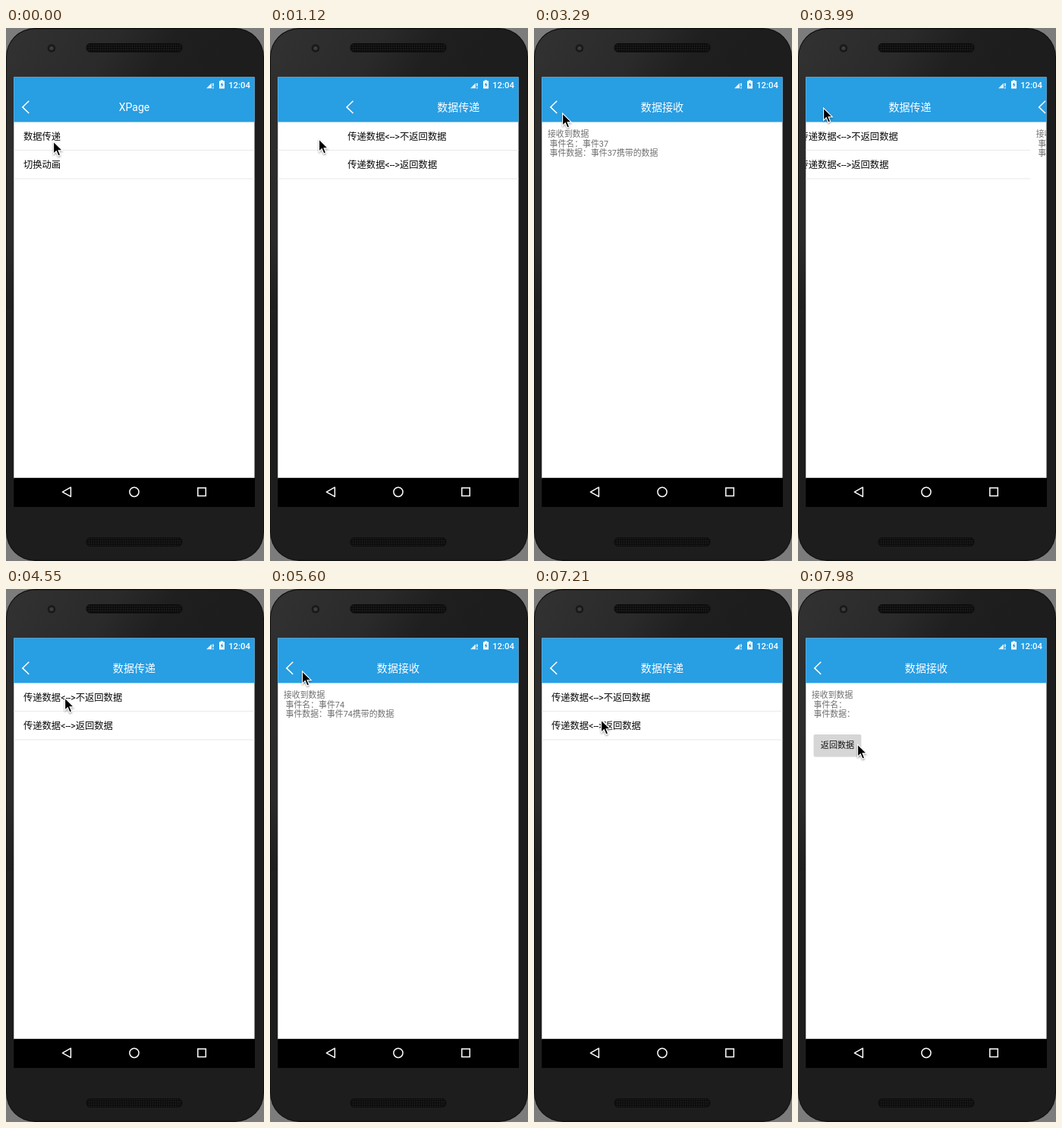
These frames come from a looping animation (340x700 px, 8000 ms). An HTML page:

```html
<!DOCTYPE html>
<html lang="zh-CN">
<head>
<meta charset="utf-8">
<title>Page transitions</title>
<style>
  html, body { margin: 0; width: 100%; height: 100%; overflow: hidden; background: #7c7c7c; }
  svg { display: block; width: 340px; height: 700px; }
  text { font-family: Roboto, "Noto Sans CJK SC", "Noto Sans CJK", sans-serif; white-space: pre; }
  .title { font-size: 14.08px; fill: #fff; text-anchor: middle; }
  .row { font-size: 12.32px; fill: #0a0a0a; }
  .note { font-size: 10.88px; fill: #6e6e6e; }
  .button { font-size: 11.1px; font-weight: 500; fill: #111; text-anchor: middle; }
  .clock { font-size: 11.3px; font-weight: 500; fill: #fff; }
  .line { fill: none; stroke: #fff; stroke-width: 1.5; }
</style>
</head>
<body>
<svg id="stage" viewBox="0 0 340 700" xmlns="http://www.w3.org/2000/svg">
  <defs>
    <linearGradient id="shell" gradientUnits="userSpaceOnUse" x1="0" y1="0" x2="230" y2="130">
      <stop offset="0" stop-color="#323232"/>
      <stop offset=".5" stop-color="#2a2a2a"/>
      <stop offset=".75" stop-color="#1f1f1f"/>
      <stop offset="1" stop-color="#1d1d1d"/>
    </linearGradient>
    <linearGradient id="side" x1="0" y1="0" x2="0" y2="1">
      <stop offset="0" stop-color="#2f2f2f"/>
      <stop offset=".7" stop-color="#2a2a2a"/>
      <stop offset="1" stop-color="#1e1e1e"/>
    </linearGradient>
    <pattern id="mesh" width="3" height="3" patternUnits="userSpaceOnUse">
      <rect width="3" height="3" fill="#0d0d0d"/>
      <circle cx="1.5" cy="1.5" r=".8" fill="#242424"/>
    </pattern>
    <clipPath id="screen"><rect x="10.3" y="64.5" width="317.2" height="526.5"/></clipPath>
    <filter id="shadow" x="-50%" y="-50%" width="200%" height="200%">
      <feDropShadow dx="0" dy="1.5" stdDeviation="1.1" flood-opacity=".4"/>
    </filter>
  </defs>

  <rect width="340" height="700" fill="#7c7c7c"/>
  <rect x="0" y="0" width="340" height="700" rx="38" fill="#111"/>
  <rect x="1" y="1.5" width="338" height="697" rx="37" fill="url(#shell)"/>
  <rect x="1" y="60" width="9.3" height="310" fill="url(#side)"/>
  <rect x="106" y="20.5" width="126" height="11" rx="5" fill="url(#mesh)" stroke="#0c0c0c"/>
  <rect x="106" y="669.5" width="126" height="11" rx="5" fill="url(#mesh)" stroke="#0c0c0c"/>
  <circle cx="60" cy="26.5" r="5.3" fill="#191919"/>
  <circle cx="60" cy="26.5" r="2.6" fill="#3b3d40"/>

  <rect x="10.3" y="64.5" width="317.2" height="527" fill="#fff"/>
  <rect x="10.3" y="64.5" width="317.2" height="59" fill="#289ee3"/>
  <g id="pages" clip-path="url(#screen)"></g>

  <path d="M264 79.2L274 69.2V79.2Z" fill="#fff" fill-opacity=".85"/>
  <path d="M271 69V79.3H274.5V69Z" fill="#289ee3"/>
  <path d="M272.9 72.5V76.6M272.9 77.7V79.2" class="line" stroke-width="1.3"/>
  <path d="M283 68.5H286V69.6H288V79.4H281V69.6H283Z" fill="#fff"/>
  <path d="M285.2 71L282.6 75H284.2V78L286.5 74H285.2Z" fill="#289ee3"/>
  <text class="clock" x="293.2" y="78.5">12:04</text>

  <rect x="10.3" y="590.8" width="317.7" height="38.2" fill="#000"/>
  <path class="line" d="M85.4 603.2V615.4L74.4 609.3Z" stroke-linejoin="round"/>
  <circle class="line" cx="169" cy="609.3" r="6.1"/>
  <rect class="line" x="252.8" y="604" width="10.5" height="10.5"/>

  <g id="cursor" filter="url(#shadow)">
    <path d="M.6 1V17.2L4.3 13.7L6.9 19.9L9.7 18.7L7.1 12.7H12.2Z" fill="#000" stroke="#fff" stroke-width="1.1"/>
  </g>
</svg>

<script>
const LOOP = 8000, STEP = 70, WIDTH = 317.2, SLIDE = 500;

const make = (parent, tag, attrs, text = "") => {
  const node = document.createElementNS("http://www.w3.org/2000/svg", tag);
  for (const key in attrs) node.setAttribute(key, attrs[key]);
  node.textContent = text;
  parent.append(node);
  return node;
};
const label = (parent, kind, x, y, text) => make(parent, "text", { class: kind, x, y }, text);

function makePage(title) {
  const page = make(document.getElementById("pages"), "g", {});
  make(page, "path", { class: "line", d: "M30.3 95.8L21.8 103.9L30.3 112" });
  label(page, "title", 169, 108.8, title);
  return page;
}

function listPage(title, rows) {
  const page = makePage(title);
  rows.forEach((text, i) => {
    label(page, "row", 22.9, 146.6 + i * 37.4, text);
    make(page, "rect", { x: 10.3, y: 160 + i * 37.4, width: WIDTH, height: 1, fill: "#e9e9e9" });
  });
  return page;
}

function eventPage(id, button) {
  const page = makePage("数据接收");
  const name = id && `事件${id}`, data = id && `事件${id}携带的数据`;
  label(page, "note", 17.9, 143.1, "接收到数据");
  label(page, "note", 20.6, 155.6, `事件名：${name}`);
  label(page, "note", 20.6, 168.2, `事件数据：${data}`);
  if (button) {
    make(page, "rect", { x: 20.6, y: 191, width: 62.8, height: 29.4, rx: 1.8, fill: "#d6d6d6" });
    label(page, "button", 52, 209.4, button);
  }
  return page;
}

const pages = {
  home: listPage("XPage", ["数据传递", "切换动画"]),
  list: listPage("数据传递", ["传递数据<-->不返回数据", "传递数据<-->返回数据"]),
  first: eventPage("37"),
  second: eventPage("74"),
  reply: eventPage("", "返回数据")
};

// start time, leaving page, entering page, direction (1 = forward)
const slides = [
  [870, "home", "list", 1],
  [2200, "list", "first", 1],
  [3620, "first", "list", -1],
  [4640, "list", "second", 1],
  [6120, "second", "list", -1],
  [7260, "list", "reply", 1]
];

// time, x, y
const path = [
  [0, 62, 148], [250, 62, 148], [420, 38, 152], [560, 62, 146], [630, 64, 145],
  [1890, 64, 145], [2100, 70, 145], [2730, 70, 145], [3290, 37, 111], [3500, 33, 104],
  [4060, 33, 104], [4480, 77, 142], [5000, 77, 142], [5180, 62, 130], [5600, 42, 107],
  [5740, 38, 102], [5810, 38, 102], [5880, 37, 102], [6500, 37, 102], [6860, 80, 163],
  [7140, 88, 171], [7350, 88, 171], [7700, 82, 194], [7980, 78, 203]
];

function place(name, x) {
  pages[name].setAttribute("transform", `translate(${x} 0)`);
  pages[name].style.display = "inline";
}

function drawPages(t) {
  for (const name in pages) pages[name].style.display = "none";
  const slide = slides.filter(s => s[0] <= t).pop();
  if (!slide) return place("home", 0);
  const [start, from, to, dir] = slide;
  const left = 1 - Math.min(1, (t - start) / SLIDE);
  const rest = left * left;
  if (rest > 0) place(from, -dir * WIDTH * (1 - rest));
  place(to, dir * WIDTH * rest);
}

const cursor = document.getElementById("cursor");
function drawCursor(t) {
  const i = path.findIndex(p => p[0] > t);
  const b = i < 0 ? path[path.length - 1] : path[i];
  const a = i < 0 ? b : path[i - 1];
  const k = a === b ? 0 : (t - a[0]) / (b[0] - a[0]);
  const mix = n => a[n] + (b[n] - a[n]) * k;
  cursor.setAttribute("transform", `translate(${mix(1)} ${mix(2)})`);
}

const begin = performance.now();
function draw() {
  const time = (performance.now() - begin) % LOOP;
  const t = Math.floor(time / STEP) * STEP;
  drawPages(t);
  drawCursor(t);
  requestAnimationFrame(draw);
}
draw();
</script>
</body>
</html>
```
